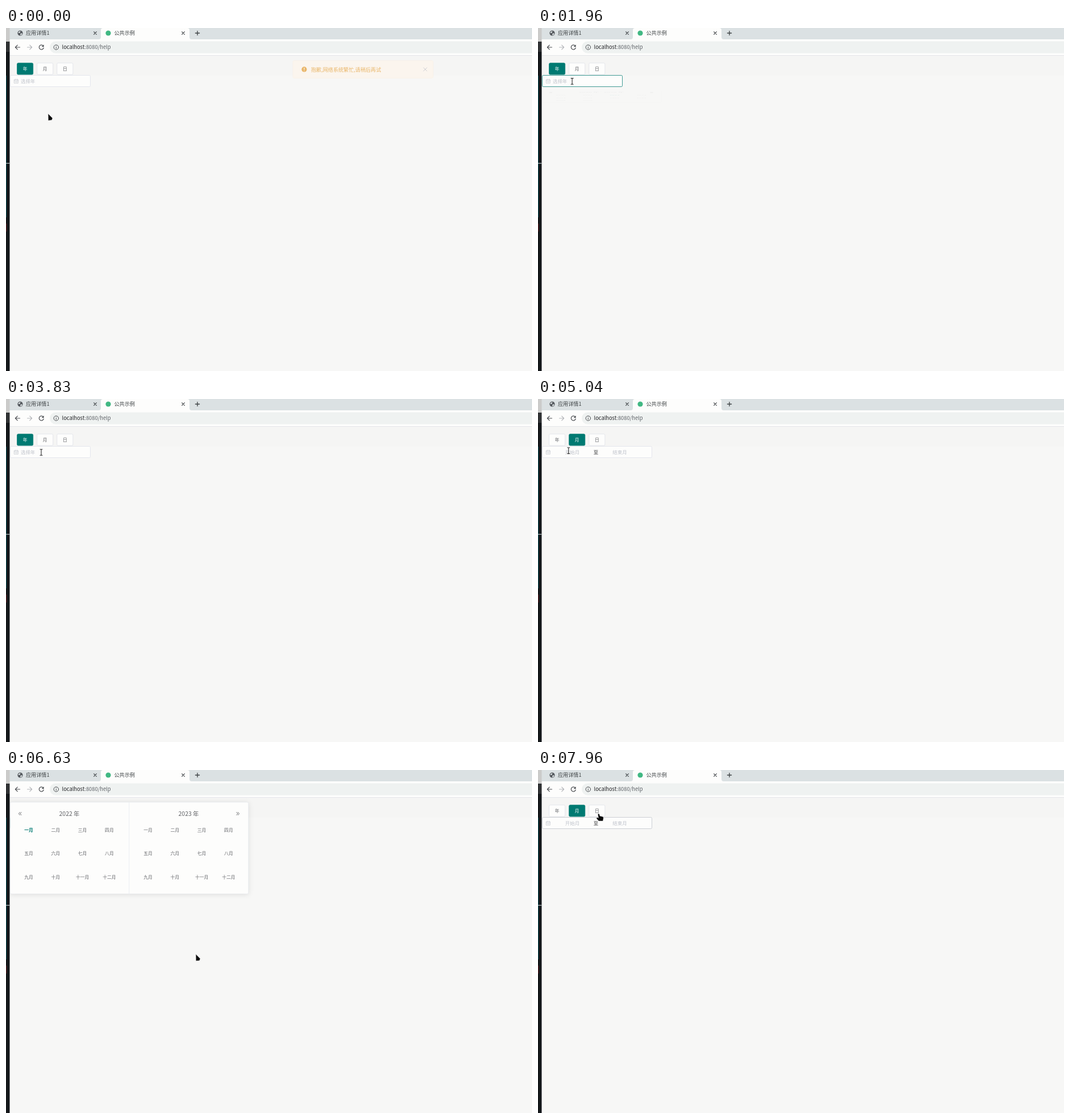
Recreate the animation shown at these times as an HTML page. Size 926 px wide and 605 px high, loop 8000 ms.

```html
<!DOCTYPE html>
<html lang="zh">
<head>
<meta charset="utf-8">
<style>
  html, body { margin: 0; width: 100%; height: 100%; overflow: hidden; }
  svg { display: block; width: 926px; height: 605px; }
  text { font-family: "Noto Sans CJK SC", "Noto Sans CJK", "Noto Sans", sans-serif; }
  .line { fill: none; stroke-linecap: round; stroke-linejoin: round; }
  .card { fill: #fdfdfc; stroke: #e4e7ed; stroke-width: .7; filter: drop-shadow(0 1.3px 4px rgba(0,0,0,.1)); }
  .cell.hover, .cell.now { fill: #007a72; }
  .now { font-weight: 700; }
</style>
</head>
<body>
<svg id="stage" viewBox="0 0 926 605"></svg>
<script>
const LOOP = 8000, TEAL = '#007a72', GREY = '#606266', PALE = '#bfc3cb', WHITE = '#fdfdfc';
const stage = document.getElementById('stage');

// Text placed by the middle of its line
const label = (x, y, size, str, fill = GREY, anchor = 'middle', extra = '') =>
  `<text x="${x}" y="${y + size * .36}" font-size="${size}" fill="${fill}" text-anchor="${anchor}" ${extra}>${str}</text>`;
const rect = (x, y, w, h, fill, extra = '') =>
  `<rect x="${x}" y="${y}" width="${w}" height="${h}" fill="${fill}" ${extra}/>`;
const line = (d, stroke, width = 1, extra = '') =>
  `<path class="line" d="${d}" stroke="${stroke}" stroke-width="${width}" ${extra}/>`;
const cross = (x, y, r, stroke, width) =>
  line(`M${x - r} ${y - r}l${2 * r} ${2 * r}m0 ${-2 * r}l${-2 * r} ${2 * r}`, stroke, width);
const chevrons = (x, y, dir) =>
  line([-1.6, 1].map(dx => `M${x + dx + dir} ${y - 2.5}l${-2 * dir} 2.5l${2 * dir} 2.5`).join(''), GREY, .9);
const calendar = line('M14.7 91h6.6v6.3h-6.6zM14.7 93.2h6.6M16.4 90v1.5M19.6 90v1.5M16.4 95.2h3.2', PALE, .7);

const cell = (x, y, str, now) =>
  label(x, y, 7.8, str, GREY, 'middle', `class="cell${now ? ' now' : ''}" data-x="${x}" data-y="${y}"`);
const grid = (items, x0, y0, rowStep, now) => items.map((str, i) =>
  cell(x0 + i % 4 * 47.3, y0 + Math.floor(i / 4) * rowStep, str, i === now)).join('');

const years = Array.from({ length: 10 }, (_, i) => 2020 + i);
const months = [...'一二三四五六七八九十', '十一', '十二'].map(m => m + '月');

const chrome = `
  ${rect(0, 0, 926, 20, '#dbe1e3')}
  ${rect(7, 20, 919, 28.5, WHITE)}
  <path d="M163 20q4 0 4-4V4q0-4 4-4h148q4 0 4 4v12q0 4 4 4z" fill="${WHITE}"/>
  <circle cx="25" cy="9" r="4.6" fill="#55595e"/>
  <path d="M21.5 8q2-3 4-2l-1 2.2l-2 1zM25 10.5l2-1.5l1.7 1q-.6 2.3-3 3z" fill="#dbe1e3"/>
  ${label(35, 9, 9.1, '应用详情1', '#3c4043', 'start')}
  ${cross(157, 9, 2.3, '#3c4043', 1.2)}
  <circle cx="180" cy="9" r="4.6" fill="#41b883"/>
  ${label(190.5, 9, 9.1, '公共示例', '#3c4043', 'start')}
  ${cross(312, 9, 2.3, '#3c4043', 1.2)}
  ${line('M333.4 9h7.2M337 5.4v7.2', '#3c4043', 1.3)}
  ${line('M24.5 34h-8M20.2 30.2L16.4 34l3.8 3.8', '#4a4d51', 1.2)}
  ${line('M37.5 34h8M41.8 30.2l3.8 3.8l-3.8 3.8', '#b4b7ba', 1.2)}
  ${line('M65.4 31.4A4 4 0 1 0 66.2 35', '#4a4d51', 1.2)}
  <path d="M66.6 29.2v4h-4z" fill="#4a4d51"/>
  ${rect(77, 23.5, 870, 21, '#eff2f1', 'rx="10.5"')}
  <circle cx="88.3" cy="34" r="4.2" fill="none" stroke="#4a4d51"/>
  ${line('M88.3 33.7v2.4M88.3 31.8v.1', '#4a4d51', 1)}
  ${label(98.5, 34, 9.3, 'localhost<tspan fill="#5f6368">:8080/help</tspan>', '#202124', 'start')}
  ${rect(7, 48, 919, .8, '#dfe0e6')}`;

const edge = `
  ${rect(0, 0, 6.5, 24, '#cbcbca')}
  ${rect(0, 24, 6.5, 18, '#303234')}
  ${rect(0, 42, 6.5, 563, '#14171a')}
  ${rect(0, 84, 1, 250, '#0b5258')}
  ${rect(0, 238, 6.5, 1.2, '#b9c6c8')}
  ${rect(0, 345, 1.5, 14, '#4a1c20')}`;

const buttons = [...'年月日'].map((str, i) => `<g class="tab">
  ${rect(19.5 + i * 35.1, 61.8, 28.2, 20.3, WHITE, 'rx="2" stroke="#dcdfe6" stroke-width=".7"')}
  ${label(33.6 + i * 35.1, 72, 7.8, str)}</g>`).join('');

stage.innerHTML = `
  <clipPath id="page">${rect(7, 49, 919, 556, '#000')}</clipPath>
  ${rect(0, 0, 926, 605, '#f7f7f6')}
  ${rect(7, 49, 919, 34.5, '#f5f5f4')}
  ${chrome}
  <g clip-path="url(#page)">
    ${buttons}
    <rect id="input" x="7.5" y="83.5" height="20" rx="2" fill="${WHITE}"/>
    ${calendar}
    <g id="yearHint">${label(26, 94, 8.45, '选择年', PALE, 'start')}</g>
    <g id="monthHint">
      ${label(60.5, 94, 8.45, '开始月', PALE)}
      ${label(102, 94, 8.45, '至', '#303133')}
      ${label(144, 94, 8.45, '结束月', PALE)}
    </g>
    <g id="toast">
      ${rect(505, 57.5, 247, 31, '#fdf5ec', 'rx="2.6" stroke="#fbf0e2" stroke-width=".7"')}
      <circle cx="525" cy="73" r="4.6" fill="#e6a23c"/>
      ${line('M525 70.4v2.9M525 75.4v.1', '#fff', 1.1)}
      ${label(537, 73.5, 9.1, '抱歉,网络系统繁忙,请稍后再试', '#e6a23c', 'start')}
      ${cross(738, 73, 3, '#b4b8c0', .8)}
    </g>
    <g id="yearPanel">
      ${rect(7.3, 112, 209.3, 185, '', 'class="card" rx="2.6"')}
      <path d="M30 112.5l4-4.2l4 4.2z" fill="${WHITE}"/>
      ${chevrons(22.5, 129.5, 1)}${chevrons(200.5, 129.5, -1)}
      ${label(111.5, 130, 10.4, '2020 年 - 2029 年')}
      ${rect(16, 147.5, 193, .7, '#ebeef5')}
      ${grid(years, 40, 171, 46.7, 2)}
    </g>
    <g id="monthPanel">
      ${rect(7.3, 56.8, 419.5, 161.8, '', 'class="card" rx="2.6"')}
      ${rect(216.5, 57, .7, 161.5, '#e4e7ed')}
      ${chevrons(25, 77, 1)}${chevrons(408.5, 77, -1)}
      ${label(111.5, 77.5, 10.4, '2022 年')}${label(321.5, 77.5, 10.4, '2023 年')}
      ${grid(months, 40, 105.7, 41.5, 0)}${grid(months, 250, 105.7, 41.5)}
    </g>
  </g>
  ${edge}
  <g id="cursor">
    <path data-kind="arrow" d="M-.9-.9L7 7L5.6 10.6L-.7 11.2z" fill="#0c0c0c" stroke="#fff" stroke-width=".5"/>
    <path data-kind="hand" d="M-1.8 1Q-.4-.8 1.2 1L2 4L7 5.2Q8.6 5.8 8.3 8L7.4 13H-.1L-4 8.8Q-4.6 6.4-2.2 6.8L-.6 7.4z" fill="#0c0c0c" stroke="#fff" stroke-width=".5"/>
    <path data-kind="beam" class="line" d="M-2-5.3h1.4L0-4.7L.6-5.3H2M0-4.7V4.7M-2 5.3h1.4L0 4.7L.6 5.3H2" stroke="#2a2a2a" stroke-width="1.1"/>
  </g>`;

// Pointer path: time, x, y, shape from that time on
const track = [
  [0, 75, 152, 'arrow'], [150, 75, 152, 'arrow'], [560, 58, 103, 'beam'], [720, 57, 92, 'beam'],
  [1000, 57, 92, 'beam'], [1300, 62, 93, 'beam'], [2000, 60, 94, 'beam'], [2280, 66, 150, 'hand'],
  [2620, 72, 197, 'hand'], [2750, 72, 197, 'hand'], [3080, 100, 225, 'hand'], [3400, 88, 185, 'hand'],
  [3620, 65, 103, 'beam'], [3760, 62, 94, 'beam'], [4250, 62, 94, 'beam'], [4500, 68, 76, 'hand'],
  [4900, 68, 76, 'hand'], [5000, 55, 90, 'beam'], [5300, 46, 98, 'beam'], [5880, 46, 98, 'beam'],
  [6050, 90, 130, 'hand'], [6300, 200, 222, 'arrow'], [6680, 355, 341, 'arrow'], [7330, 355, 341, 'arrow'],
  [7560, 240, 205, 'arrow'], [7740, 125, 98, 'beam'], [7860, 107, 80, 'hand'], [7950, 107, 77, 'hand'], [LOOP, 107, 77, 'hand']
];

const $ = id => document.getElementById(id);
const clamp = v => Math.min(1, Math.max(0, v));
const easeOut = v => 1 - (1 - clamp(v)) ** 3;
const show = (el, on) => el.setAttribute('visibility', on ? 'visible' : 'hidden');
const tabs = [...document.querySelectorAll('.tab')];
const cells = [...document.querySelectorAll('.cell')];
const shapes = [...$('cursor').children];

function pointerAt(t) {
  const i = track.findIndex((key, n) => t < track[n + 1][0]);
  const [t0, x0, y0, kind] = track[i], [t1, x1, y1] = track[i + 1];
  const p = (t - t0) / (t1 - t0);
  return { x: x0 + (x1 - x0) * p, y: y0 + (y1 - y0) * p, kind };
}

function unfold(el, top, t, open, close) {
  const k = easeOut((t - open) / 300) * (1 - easeOut((t - close) / 300));
  show(el, k > .005);
  el.setAttribute('opacity', k);
  el.setAttribute('transform', `translate(0 ${top}) scale(1 ${k}) translate(0 ${-top})`);
}

function draw(t) {
  const { x, y, kind } = pointerAt(t);
  $('cursor').setAttribute('transform', `translate(${x} ${y})`);
  shapes.forEach(s => show(s, s.dataset.kind === kind));

  const monthMode = t >= 4650;
  tabs.forEach((tab, i) => {
    const on = i === +monthMode;
    const [box, text] = tab.children;
    box.setAttribute('fill', on ? TEAL : WHITE);
    box.setAttribute('stroke', on ? TEAL : '#dcdfe6');
    text.setAttribute('fill', on ? '#fff' : GREY);
  });

  const focused = t >= 1900 && t < 3450 || t >= 5350 && t < 6850;
  const hovered = t > 560 && t < 1900 || t > 3850 && t < 4400 || t > 7740;
  $('input').setAttribute('width', monthMode ? 193 : 141);
  $('input').setAttribute('stroke', focused ? TEAL : hovered ? '#c0c4cc' : '#dfe1ea');
  $('input').setAttribute('stroke-width', focused ? .75 : .8);
  show($('yearHint'), !monthMode);
  show($('monthHint'), monthMode);

  const leave = t / 320;
  show($('toast'), leave < 1);
  $('toast').setAttribute('opacity', .75 * (1 - clamp(leave)));
  $('toast').setAttribute('transform', `translate(0 ${-26 * clamp(leave)})`);

  unfold($('yearPanel'), 112, t, 1950, 3450);
  unfold($('monthPanel'), 57, t, 5380, 6850);
  cells.forEach(c => c.classList.toggle('hover', kind === 'hand' &&
    Math.abs(x - c.dataset.x) < 23.5 && Math.abs(y - c.dataset.y) < 21));
}

function tick() {
  draw(performance.now() % LOOP);
  requestAnimationFrame(tick);
}
tick();
</script>
</body>
</html>
```
